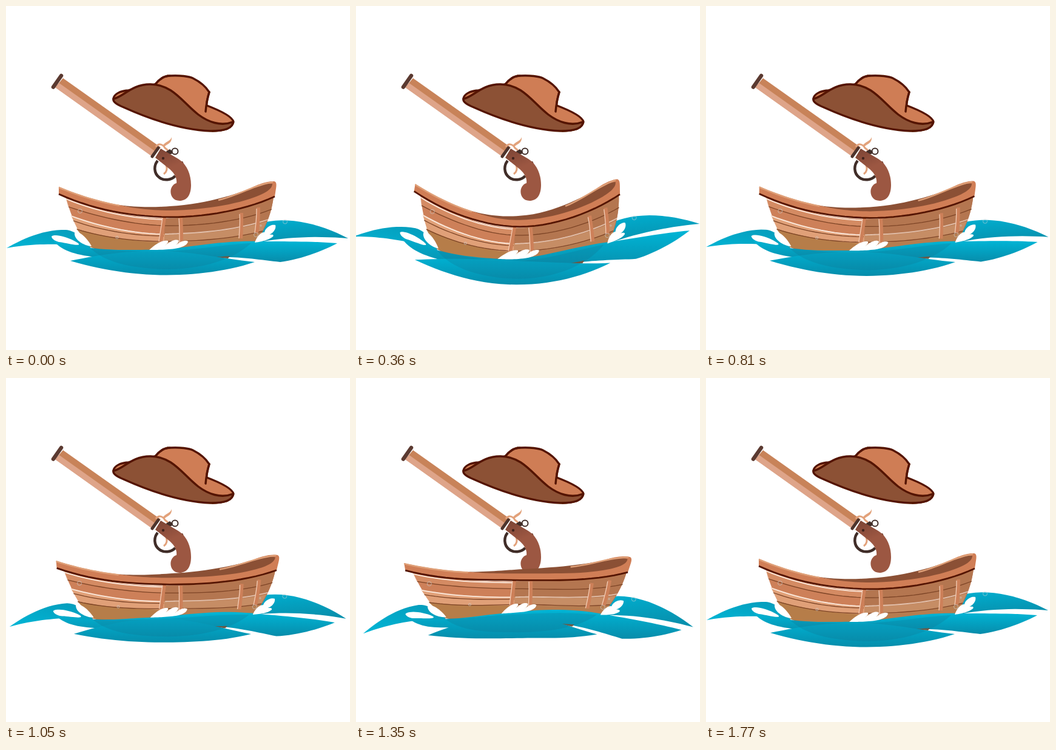
Animation of 567x567 px, one loop 1.8 s. Source, as an HTML page:

```html
<!DOCTYPE html>
<html lang="en">
<head>
<meta charset="utf-8">
<title>Rowing boat on waves</title>
<style>
html, body { margin: 0; width: 100%; height: 100%; overflow: hidden; background: #fff; }
svg { display: block; width: 100vw; height: 100vh; }
.seam { fill: none; stroke: #7d4426; stroke-width: 1.3; }
.shine { fill: none; stroke: #fbe9dd; stroke-width: 1.8; }
.post { fill: none; stroke: #cd8059; stroke-width: 6; }
.edge { fill: none; stroke: #f3cdb6; stroke-width: 1.3; }
.foam { fill: #fff; }
.bubble { fill: none; stroke: #c9d3d5; stroke-opacity: .6; stroke-width: 1; }
.hat { stroke: #541400; stroke-width: 3.4; stroke-linejoin: round; stroke-linecap: round; }
</style>
</head>
<body>
<svg viewBox="0 0 567 567">
  <defs>
    <linearGradient id="back" x1="0" y1="0" x2=".3" y2="1">
      <stop offset="0" stop-color="#00aecf"/><stop offset="1" stop-color="#0791ae"/>
    </linearGradient>
    <linearGradient id="left" x1="1" y1="0" x2="0" y2="1">
      <stop offset="0" stop-color="#069ab9"/><stop offset="1" stop-color="#00b6d6"/>
    </linearGradient>
    <linearGradient id="mid" x1="0" y1="0" x2="0" y2="1">
      <stop offset="0" stop-color="#00b5d6"/><stop offset="1" stop-color="#078caa"/>
    </linearGradient>
    <linearGradient id="front" x1="0" y1="0" x2="0" y2="1">
      <stop offset="0" stop-color="#00afd0"/><stop offset="1" stop-color="#068dab"/>
    </linearGradient>
    <linearGradient id="grip" x1="0" y1="0" x2=".3" y2="1">
      <stop offset="0" stop-color="#7a4334"/><stop offset=".45" stop-color="#9c5742"/>
    </linearGradient>
  </defs>

  <g id="hat">
    <path class="hat" fill="#cf7d55" d="M177,153 C178,145 188,140 202,139 L246,129 C254,119 261,115 270,115 C287,114 302,116 308,119 C320,125 330,134 335,142 C332,152 330,160 331,164 C352,172 373,182 375,191 C373,201 360,206 340,206 Z"/>
    <path class="hat" fill="#8c5135" d="M177,153 C194,150 206,129 238,129 C275,129 292,160 317,179 C333,191 354,199 374,191 C374,203 355,206 337,206 C286,204 234,185 194,167 C182,162 176,158 177,153 Z"/>
    <path class="hat" fill="none" d="M246,129 C254,119 261,115 270,115 M335,142 C332,152 330,162 329,174"/>
  </g>

  <g id="gun">
    <path fill="#c88359" d="M94,119 L255,233 L242,248 L81,134 Z"/>
    <path fill="#dea489" d="M87.500,127 L248,241 L242,249 L81,134 Z"/>
    <path stroke="#5b3a31" stroke-width="6.500" stroke-linecap="round" d="M91,115 L78,133.500"/>
    <path fill="none" stroke="#e2a27b" stroke-width="3" d="M247,232 C251,226 258,227 262,234 L267,238"/>
    <path fill="#e2a27b" d="M259,229 C265,222 271,223 273,216 C274,226 266,227 261,232 Z"/>
    <path fill="none" stroke="#402d28" stroke-width="4.500" d="M250,255 C243,263 244,276 252,282 C260,289 273,287 279,280"/>
    <path fill="none" stroke="#e2a27b" stroke-width="3" d="M260,277 C266,273 266,268 264,262"/>
    <path fill="#402d28" d="M262,241 L270,236 L275,240 L273,244 L265,245 Z"/>
    <circle cx="278.500" cy="239.500" r="5" fill="none" stroke="#402d28" stroke-width="2"/>
    <path stroke="#6b3c30" stroke-width="4" stroke-linecap="round" d="M290,258 L292,264"/>
    <path fill="url(#grip)" d="M255,235 L284,252 C297,260 305,276 305,295 C305,312 298,321 286,321 C268,321 267,296 281,292 C282,285 279,277 270,269 L246,250 Z"/>
    <circle cx="259" cy="251" r="2.200" fill="#40231d"/>
    <path stroke="#4e342d" stroke-width="5" stroke-linecap="round" d="M251,234 L241,248"/>
  </g>

  <g id="sea">
    <path fill="url(#left)" d="M1,399 C27,384 62,368 99,369 C110,370 122,377 138,394 L140,402 C122,398 105,394 88,393 C58,392 28,394 1,399 Z"/>
    <path fill="url(#back)" d="M408,391 L424,357 C470,346 522,361 564,383 C515,379 460,380 408,391 Z"/>

    <path fill="#cd8059" d="M98,313 C150,337 205,350 270,350 C335,349 395,336 441,315 C438,338 430,364 411,391 L365,410 C335,417 305,419 270,419 C220,417 170,410 139,397 C118,373 107,346 98,313 Z"/>
    <path fill="#e0a078" d="M107,345 C150,360 205,375 262,376 L262,390 C205,389 155,379 118,368 Z"/>
    <path fill="#dc986f" d="M102,330 C150,346 205,360 262,362 L262,352 C205,350 150,339 99,318 Z" opacity=".45"/>
    <path fill="#b67d49" d="M116,367 C155,379 205,388 262,390 L262,419 C220,417 170,410 139,397 Z"/>
    <path fill="#b47650" d="M261,350 C335,349 395,336 441,315 C438,338 430,364 411,391 L365,410 C335,417 305,419 261,419 Z"/>
    <path fill="#c68d65" d="M261,376 C325,376 380,370 430,355 L422,372 C380,383 325,389 261,390 Z"/>
    <path fill="#b67d50" d="M261,390 C325,389 380,383 423,372 L411,391 L365,410 C335,417 305,419 261,419 Z"/>
    <path class="seam" d="M103,331 C150,347 205,360 260,362 C325,363 390,354 438,335 M117,368 C155,380 205,388 260,388 C325,388 380,382 423,371 M111,354 C150,368 205,379 260,379"/>
    <path class="shine" d="M99,318 C150,339 205,350 258,352 M107,346 C150,362 205,375 258,376"/>
    <path class="shine" stroke-opacity=".65" d="M262,376 L288,375 C340,373 390,366 432,352"/>
    <path class="post" d="M261,348 C259,362 257,375 255,389 M288,349 C289,363 289,377 289,392"/>
    <path class="edge" d="M258,349 C256,362 254,375 252,388 M285,350 C286,363 286,377 286,391"/>
    <path class="post" stroke-width="5" d="M388,341 C388,355 388,369 387,383 M416,332 C416,346 415,360 413,374"/>
    <path class="edge" d="M385,343 C386,355 385,369 384,383 M413,334 C413,346 412,360 410,374"/>

    <path fill="#8b5035" d="M187,328 C215,332 243,332 270,330 C325,327 378,311 405,300 C420,294 432,290 441,291 L442,303 C390,330 330,343 270,342 C240,340 213,335 187,328 Z"/>
    <path fill="#d07e56" d="M87,298 C118,311 153,322 187,328 C213,334 240,337 270,337 C325,336 375,328 410,315 C429,308 439,301 439,293 C427,292 415,297 400,302 C412,295 431,288 442,289 C446,290 446,294 445,301 L443,314 C395,337 330,349 270,349 C205,347 145,336 87,310 Z"/>
    <path fill="none" stroke="#dfa078" stroke-width="2.500" d="M87,299 C118,312 153,323 187,329 M350,320 C385,311 408,296 440,290"/>
    <path fill="none" stroke="#541400" stroke-width="2.800" d="M87,310 C145,336 205,347 270,348 C330,348 395,336 443,314"/>

    <path fill="url(#mid)" d="M78,387 C105,395 145,402 195,402 C225,402 245,402 270,400 C315,396 360,386 420,388 C465,388 510,388 546,391 C520,405 483,418 452,422 C425,419 398,415 369,414 L270,421 C220,420 170,420 140,413 C112,409 92,403 78,387 Z"/>
    <path fill="#87512f" d="M345,414 L369,412 L366,416 Z"/>
    <path fill="url(#front)" d="M106,420 C150,411 200,402 262,404 C315,406 360,417 410,422 C365,437 315,443 265,443.500 C212,443.500 159,435.500 106,420 Z"/>
    <path fill="#126f8c" fill-opacity=".24" d="M137,397 C160,422 205,433 268,434 C325,433 375,418 404,391 C350,394 315,402 268,404 C215,405 170,404 137,397 Z"/>

    <path class="foam" d="M75,380 C78,375 103,380 119,391 C126,398 98,390 87,389 C80,387 76,384 75,380 Z"/>
    <path class="foam" d="M113,374 C119,369 133,381 141,396 C132,396 112,387 113,374 Z"/>
    <path class="foam" d="M236,402 C247,392 258,385 267,387 C268,390 264,393 262,395 C271,387 281,383 285,387 C284,391 281,393 279,395 C287,388 296,385 300,388 C299,394 291,398 278,400 C262,402 247,402 236,402 Z"/>
    <path class="foam" d="M410,390 C413,381 419,373 426,373 C427,366 437,359 444,361 C446,368 439,375 434,377 C439,376 442,377 440,380 C433,386 422,388 410,390 Z"/>
    <circle class="bubble" cx="122" cy="338" r="3.500"/>
    <circle class="bubble" cx="183" cy="381.500" r="2"/>
    <circle class="bubble" cx="412" cy="377" r="3.500"/>
    <circle class="bubble" cx="460" cy="355.500" r="3.500"/>
    <circle class="bubble" cx="420" cy="362" r="1.200"/>
  </g>
</svg>
<script>
const LOOP = 1800, STEP = 30, PIECES = 14;
const keys = [[0, 0], [410, 1.13], [1300, -1.18], [1770, 0], [1800, 0]];

// Turns M, L, C and Z commands into a list of short straight steps.
function flatten(d) {
  const steps = [];
  let pen;
  for (const [, cmd, args] of d.matchAll(/([MLCZ])([^MLCZ]*)/g)) {
    const n = (args.match(/[\d.]+/g) || []).map(Number);
    if (cmd === 'Z') { steps.push(['Z']); continue; }
    if (cmd === 'M') steps.push(['M', ...n]);
    else {
      const [x0, y0] = pen, [x3, y3] = n.slice(-2);
      const [x1, y1, x2, y2] = cmd === 'C' ? n : [x0, y0, x3, y3];
      const mix = (a, b, c, e, t, s = 1 - t) =>
        s * s * s * a + 3 * s * s * t * b + 3 * s * t * t * c + t * t * t * e;
      for (let i = 1; i <= PIECES; i++)
        steps.push(['L', mix(x0, x1, x2, x3, i / PIECES), mix(y0, y1, y2, y3, i / PIECES)]);
    }
    pen = n.slice(-2);
  }
  return steps;
}

const paths = [...document.querySelectorAll('#sea path')].map(el =>
  ({ el, steps: flatten(el.getAttribute('d')) }));
const bubbles = [...document.querySelectorAll('#sea circle')].map(el =>
  ({ el, x: +el.getAttribute('cx'), y: +el.getAttribute('cy') }));

function bendAt(t) {
  const i = keys.findIndex(k => k[0] > t);
  const [t0, a] = keys[i - 1], [t1, b] = keys[i];
  return a + (b - a) * (t - t0) / (t1 - t0);
}

// Bends the scene about its middle: the centre sinks while the ends rise and tilt.
function warp(x, y, q) {
  const u = x - 268, r = Math.hypot(u, 85);
  return [
    x + q * 0.18 * u / r * (y - 354) - q * q * 0.009 * u,
    y + q * (15 - 0.18 * (r - 85)) + q * q
  ];
}

function draw(now) {
  const q = bendAt(Math.floor(now % LOOP / STEP) * STEP);
  for (const { el, steps } of paths)
    el.setAttribute('d', steps.map(([cmd, x, y]) =>
      cmd === 'Z' ? cmd : cmd + warp(x, y, q).map(n => n.toFixed(2))).join(''));
  for (const { el, x, y } of bubbles) {
    const [cx, cy] = warp(x, y, q);
    el.setAttribute('cx', cx);
    el.setAttribute('cy', cy);
  }
}

const start = performance.now();
function tick() {
  draw(performance.now() - start);
  requestAnimationFrame(tick);
}
tick();
</script>
</body>
</html>
```
